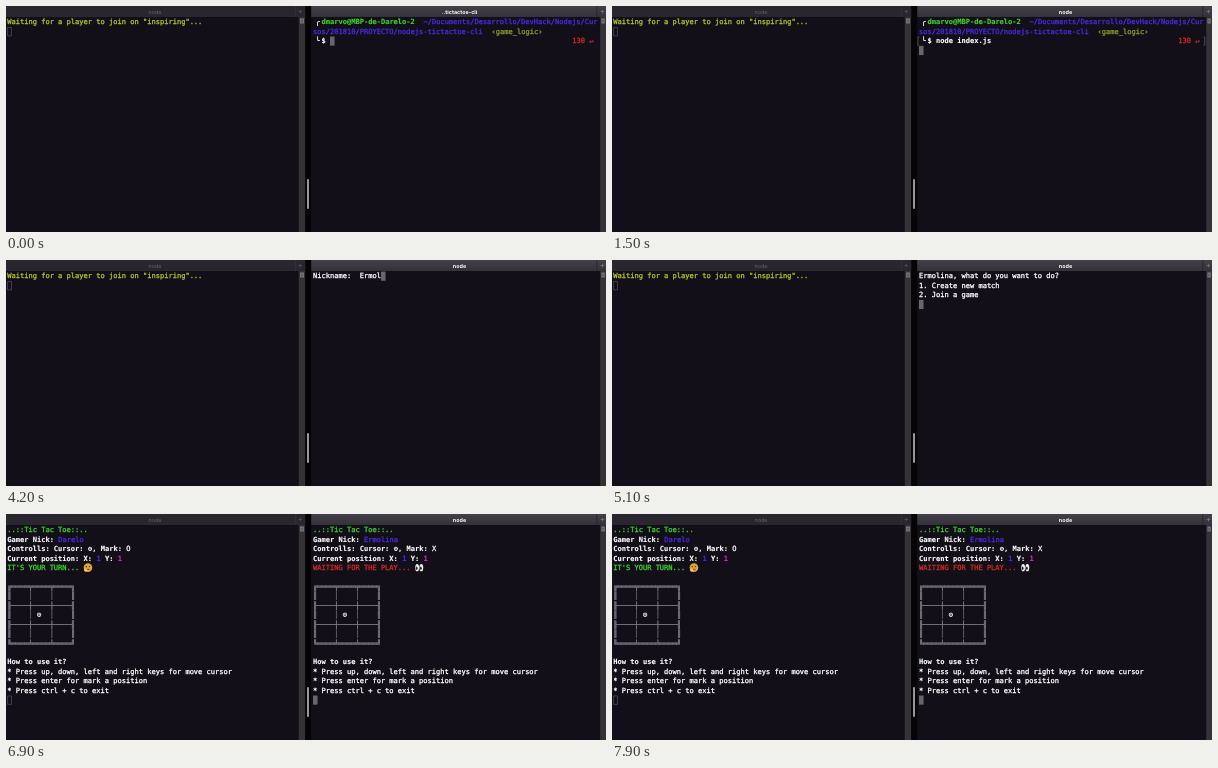
Write an HTML page with a canvas that moves like this. It is 600x226 px and loops after 8000 ms.

```html
<!DOCTYPE html>
<html lang="en">
<head>
<meta charset="utf-8">
<title>Tic Tac Toe in two terminals</title>
<style>
  html, body { margin: 0; width: 100%; height: 100%; overflow: hidden; background: #130f19; }
  canvas { display: block; width: 600px; height: 226px; }
</style>
</head>
<body>
<canvas id="stage"></canvas>
<script>
const W = 600, H = 226, LOOP = 8000;
const CW = 4.25, LH = 9.44, TOP = 11.6;
const LEFT = 1.2, RIGHT = 307;
const WHITE = '#fff', GREEN = '#3bd42c', BLUE = '#4b2ae0', YELLOW = '#b4c424',
      OLIVE = '#8c9c2c', RED = '#cc2c22', MAGENTA = '#c52fc8', GREY = '#85838a', DIM = '#67656c';
const MONO = '"DejaVu Sans Mono", monospace';
const USER = 'dmarvo', HOST = 'MBP-de-Darelo-2', HOME_NICK = 'Darelo', GUEST_NICK = 'Ermolina';
const COMMAND = 'node index.js';

const canvas = document.getElementById('stage');
const ctx = canvas.getContext('2d');
const dpr = window.devicePixelRatio || 1;
canvas.width = W * dpr;
canvas.height = H * dpr;
ctx.scale(dpr, dpr);
ctx.textRendering = 'geometricPrecision';
ctx.lineJoin = 'round';

function box(x, y, w, h, color) {
  ctx.fillStyle = color;
  ctx.fillRect(x, y, w, h);
}

function oval(x, y, rx, ry, color) {
  ctx.fillStyle = color;
  ctx.beginPath();
  ctx.ellipse(x, y, rx, ry, 0, 0, Math.PI * 2);
  ctx.fill();
}

// A row is a list of [text, color, bold] spans; a thin outline gives the terminal's heavy smoothing.
function row(x, line, spans, col = 0) {
  const y = TOP + line * LH + 6.7;
  for (const [text, color = WHITE, bold] of spans) {
    ctx.font = `${bold ? 'bold ' : ''}7.06px ${MONO}`;
    ctx.fillStyle = ctx.strokeStyle = color;
    ctx.lineWidth = bold ? 0.12 : 0.3;
    ctx.fillText(text, x + col * CW, y);
    ctx.strokeText(text, x + col * CW, y);
    col += text.length;
  }
}

function cursor(x, line, col, hollow) {
  const cx = x + col * CW, cy = TOP + line * LH;
  if (!hollow) return box(cx, cy, CW + 0.3, LH - 0.3, '#68666c');
  ctx.strokeStyle = '#56545a';
  ctx.lineWidth = 0.7;
  ctx.strokeRect(cx + 0.4, cy + 0.4, CW - 0.4, LH - 1);
}

function title(text, x, color, bold) {
  ctx.font = `${bold ? 'bold ' : ''}5.4px Inter, sans-serif`;
  ctx.fillStyle = color;
  ctx.textAlign = 'center';
  ctx.fillText(text, x, 7.8);
  ctx.textAlign = 'left';
}

function plus(x, y, color) {
  box(x - 1.8, y - 0.3, 3.6, 0.6, color);
  box(x - 0.3, y - 1.8, 0.6, 3.6, color);
}

function scrollbar(x, w) {
  box(x, 11, w, H - 11, '#343237');
  box(x + 1.2, 12.5, w - 2.4, 5, '#77757b');
  box(x + 2, 14, w - 4, 0.6, '#4a484e');
  box(x + 2, 15.5, w - 4, 0.6, '#4a484e');
}

function chrome(t) {
  box(0, 0, W, H, '#130f19');
  box(0, 0, 300, 11, '#29272d');
  const bar = ctx.createLinearGradient(0, 0, 0, 11);
  bar.addColorStop(0, '#434147');
  bar.addColorStop(1, '#343238');
  box(305, 0, 295, 11, bar);
  box(289, 0, 0.6, 11, '#38363c');
  box(590.5, 0, 0.7, 11, '#201e23');
  plus(294.2, 5.6, '#5c5a60');
  plus(596.4, 5.6, '#89878d');
  title('node', 149, '#646268');
  title(t < 1500 ? '..tictactoe-cli' : 'node', 453.5, WHITE, true);
  scrollbar(292.8, 6.4);
  scrollbar(594.2, 5.8);
  box(299.3, 0, 5.9, H, '#050407');
  ctx.fillStyle = '#98969b';
  ctx.beginPath();
  ctx.roundRect(301, 173, 2, 30, 1);
  ctx.fill();
}

function bracket(x, dir) {
  ctx.strokeStyle = '#77757b';
  ctx.lineWidth = 0.6;
  const y = TOP + 2 * LH + 0.5;
  ctx.beginPath();
  ctx.moveTo(x + dir * 1.3, y);
  ctx.lineTo(x, y);
  ctx.lineTo(x, y + 8.2);
  ctx.lineTo(x + dir * 1.3, y + 8.2);
  ctx.stroke();
}

function shell(t) {
  row(RIGHT, 0, [['╭']], 0.6);
  row(RIGHT, 0, [[`${USER}@${HOST}`, GREEN, true],
    ['  ~/Documents/Desarrollo/DevHack/Nodejs/Cur', BLUE]], 2);
  row(RIGHT, 1, [['sos/201810/PROYECTO/nodejs-tictactoe-cli', BLUE], ['  ‹game_logic›', OLIVE]]);
  row(RIGHT, 2, [['╰']], 0.6);
  row(RIGHT, 2, [['$', WHITE, true]], 2);
  row(RIGHT, 2, [['130 ', RED], ['↵', RED, true]], 61);

  const step = Math.floor((t - 700) / 100) + 1;
  const typed = step < 1 ? 0 : step > 5 ? COMMAND.length : step * 2;
  if (t < 1300) cursor(RIGHT, 2, 4 + typed);
  row(RIGHT, 2, [[COMMAND.slice(0, typed), WHITE, true]], 4);
  if (t >= 1300) {
    bracket(305.9, 1);
    bracket(592.8, -1);
  }
  if (t >= 1500) cursor(RIGHT, 3, 0);
}

const KEYS = [2400, 2600, 3800, 4000, 4200, 4300, 4700, 4800];

function nickname(t) {
  const n = KEYS.filter(k => t >= k).length;
  cursor(RIGHT, 0, 11 + n);
  row(RIGHT, 0, [['Nickname:  ' + GUEST_NICK.slice(0, n)]]);
}

function menu(lines, answer, line, col) {
  cursor(RIGHT, line, col);
  [...lines, answer].forEach((text, i) => row(RIGHT, i, [[text]]));
}

function mainMenu(t) {
  const lines = [`${GUEST_NICK}, what do you want to do?`, '1. Create new match', '2. Join a game'];
  if (t < 6000) menu(lines, '', 3, 0);
  else if (t < 6200) menu(lines, '2', 3, 1);
  else menu(lines, '2', 4, 0);
}

function matchMenu(t) {
  if (t < 6400) menu(['Select a match:'], '', 1, 0);
  else if (t < 6600) menu(['Select a match:', '1. inspiring'], '', 2, 0);
  else menu(['Select a match:', '1. inspiring'], '1', 2, 1);
}

function face(x, y) {
  oval(x, y, 4.3, 4.3, '#e3a53c');
  oval(x - 1.6, y - 1, 0.7, 0.8, '#5c3919');
  oval(x + 1.5, y - 1.2, 0.7, 0.8, '#5c3919');
  oval(x + 0.2, y + 1.8, 1.6, 0.8, '#8b5424');
  oval(x - 2.2, y + 2.7, 1.7, 1.3, '#f0c766');
}

function eyes(x, y) {
  for (const dx of [-2.1, 2.1]) {
    oval(x + dx, y, 1.9, 3.7, '#f2f1f2');
    oval(x + dx - 0.5, y + 0.6, 0.9, 1.7, '#2a2326');
  }
}

function board(x) {
  const cells = [['║', GREY], ['    │    │    ', DIM], ['║', GREY]];
  const rule = [['╟────┼────┼────╢', GREY]];
  [[['╔════╤════╤════╗', GREY]], cells, rule, cells, rule, cells, [['╚════╧════╧════╝', GREY]]]
    .forEach((spans, i) => row(x, 6 + i, spans));
  row(x, 9, [['⊙', WHITE, true]], 7);
}

function game(x, nick, mark, status, color, icon) {
  row(x, 0, [['..::Tic Tac Toe::..', GREEN]]);
  row(x, 1, [['Gamer Nick: ', WHITE, true], [nick, BLUE]]);
  row(x, 2, [['Controlls: Cursor: ', WHITE, true], ['⊙'], [', Mark: ', WHITE, true], [mark]]);
  row(x, 3, [['Current position: X: ', WHITE, true], ['1', BLUE, true],
    [' Y: ', WHITE, true], ['1', MAGENTA, true]]);
  row(x, 4, [[status, color]]);
  icon(x + (status.length + 1) * CW, TOP + 4 * LH + 4.3);
  board(x);
  row(x, 14, [['How to use it?', WHITE, true]]);
  ['Press up, down, left and right keys for move cursor',
   'Press enter for mark a position',
   'Press ctrl + c to exit'].forEach((text, i) => row(x, 15 + i, [['* ' + text]]));
  cursor(x, 18, 0, x === LEFT);
}

function draw(t) {
  chrome(t);
  if (t >= 6900) {
    game(LEFT, HOME_NICK, 'O', "IT'S YOUR TURN... ", GREEN, face);
    game(RIGHT, GUEST_NICK, 'X', 'WAITING FOR THE PLAY... ', RED, eyes);
    return;
  }
  row(LEFT, 0, [['Waiting for a player to join on "inspiring"...', YELLOW]]);
  cursor(LEFT, 1, 0, true);
  if (t < 1800) shell(t);
  else if (t < 5100) nickname(t);
  else if (t < 6300) mainMenu(t);
  else matchMenu(t);
}

const start = performance.now();
function tick() {
  draw((performance.now() - start) % LOOP);
  requestAnimationFrame(tick);
}
tick();
</script>
</body>
</html>
```
